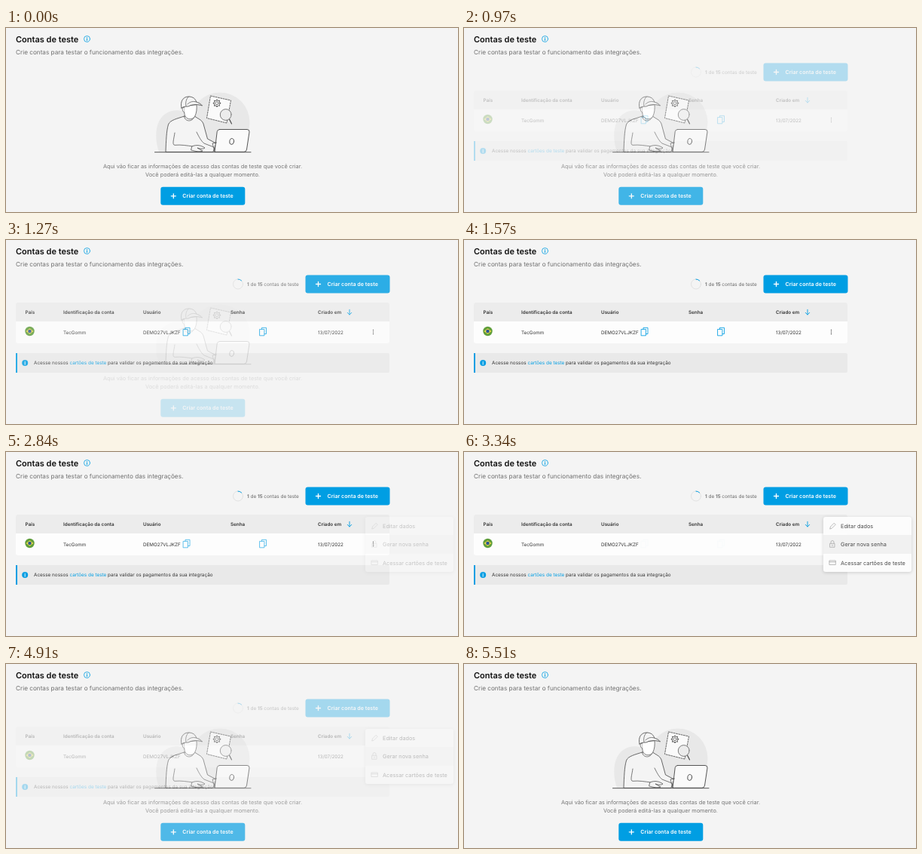
An HTML page with a canvas that plays this animation: 600x244 px, repeating every 5.63 s.

```html
<!DOCTYPE html>
<html lang="pt-BR">
<head>
<meta charset="utf-8">
<title>Contas de teste</title>
<style>
  html, body { margin: 0; width: 100%; height: 100%; overflow: hidden; background: #f4f4f4; }
  canvas { display: block; width: 600px; height: 244px; }
</style>
</head>
<body>
<canvas id="stage"></canvas>
<script>
const W = 600, H = 244, LOOP = 5630;
const BG = '#f4f4f4', BLUE = '#009ee3', INK = '#333', LINE = '#444';
const dpr = window.devicePixelRatio || 1;
let g;

function sizeCanvas(c) {
  c.width = Math.round(W * dpr);
  c.height = Math.round(H * dpr);
  return c.getContext('2d');
}

// Text is placed by the vertical centre of its capitals; returns the end x.
function text(str, x, y, size, color = INK, weight = 400, align = 'left') {
  g.font = `${weight} ${size}px Inter, "Open Sans", sans-serif`;
  g.textAlign = align;
  g.fillStyle = color;
  g.fillText(str, x, y + size * 0.36);
  return x + g.measureText(str).width;
}

function box(x, y, w, h, r, fill) {
  g.beginPath();
  g.roundRect(x, y, w, h, r);
  g.fillStyle = fill;
  g.fill();
}

function disc(x, y, r, fill) {
  g.beginPath();
  g.arc(x, y, r, 0, Math.PI * 2);
  g.fillStyle = fill;
  g.fill();
}

function ring(x, y, r, color, width, from = 0, to = Math.PI * 2) {
  g.beginPath();
  g.arc(x, y, r, from, to);
  g.strokeStyle = color;
  g.lineWidth = width;
  g.stroke();
}

function path(d, stroke, width = 0.8, fill) {
  const p = new Path2D(d);
  if (fill) {
    g.fillStyle = fill;
    g.fill(p);
  }
  if (stroke) {
    g.strokeStyle = stroke;
    g.lineWidth = width;
    g.stroke(p);
  }
}

function infoMark(x, y, color) {
  disc(x, y - 1.9, 0.6, color);
  path(`M${x} ${y - 0.6}V${y + 2.2}`, color, 0.95);
}

function button(x, y) {
  box(x, y, 112, 24, 3, BLUE);
  const cx = x + 17, cy = y + 12;
  path(`M${cx - 3} ${cy}h6M${cx} ${cy - 3}v6`, '#fff', 1.3);
  text('Criar conta de teste', x + 29, cy, 7.1, '#fff', 600);
}

function heading() {
  g.fillStyle = BG;
  g.fillRect(0, 0, W, H);
  text('Contas de teste', 13, 15, 11, '#111', 600);
  ring(107.5, 14.5, 4, BLUE, 0.8);
  infoMark(107.5, 14.5, BLUE);
  text('Crie contas para testar o funcionamento das integrações.', 13, 32, 8.2, '#707070');
}

function worker() {
  const shade = '#e8e8e8';
  disc(284, 125, 39.5, shade);
  path('M203 164C198 150 198 134 203 124C209 112 222 106 236 111L250 105L284 164Z', null, 0, shade);

  // plan sheet, gear and magnifier
  g.setLineDash([2, 1.4]);
  path('M271.5 90L298.5 96L293 126L266.5 119.5Z', LINE, 0.8, '#fafafa');
  g.setLineDash([]);
  for (let i = 0; i < 8; i++) {
    const a = i * Math.PI / 4;
    const c = Math.cos(a), s = Math.sin(a);
    path(`M${280 + 4 * c} ${99.7 + 4 * s}L${280 + 4.7 * c} ${99.7 + 4.7 * s}`, LINE, 1.2);
  }
  disc(280, 99.7, 4, '#fafafa');
  ring(280, 99.7, 4, LINE, 0.8);
  ring(280, 99.7, 2, LINE, 0.7);
  path('M296.5 121L299.5 127', LINE, 1.1);
  disc(291.7, 115, 7.4, '#ececec');
  ring(291.7, 115, 7.4, '#555', 0.75);

  // torso and arms
  path('M212 164C212.5 150 213 136 215.5 128C217.5 122 228 120 236.5 117L250.5 117C254 120 260 121.5 262 127L267.5 147L279 153L275 164Z', LINE, 0.8, BG);
  path('M236.5 117C237 124 247 126 250.5 117', LINE, 0.7);
  path('M224 139C223 147 220 155 224 155.3C232 154.5 241 156 248 157', LINE, 0.7);
  path('M253 138C256 144 259 150 263 153L276 158', LINE, 0.7);
  path('M247 157C253 154 260 156 264 159C261 161 257 160 254 159L261 163C256 165 250 163 246 162Z', LINE, 0.75, BG);

  // head and cap
  path('M236.5 104C236.5 111 236.5 115 238.5 118C241 121.5 247.5 122 250.5 117.5C253 113 253.5 107 253 102Z', LINE, 0.7, '#fff');
  path('M236.5 105C233 104 233.5 111 236.7 112', LINE, 0.7, '#fff');
  path('M233 106C231 98 234.5 91 242.5 91C248.5 91 252 94.5 252.5 98C256 99 259 101 260.5 103C255 101 247 101 242 104C239 104 236 104 233 106Z', LINE, 0.8, BG);
  path('M242.5 91C239 94 238 99 239 103.5M241 101C245 97 249 97 252.5 98', LINE, 0.65);

  // laptop and desk
  path('M283.5 134.5H320Q323.5 134.5 323 138L319.5 161Q319 164.3 316 164.3H277L280.2 137.5Q280.7 134.5 283.5 134.5Z', LINE, 0.9, '#fafafa');
  path('M277 164L274 153L279.5 152', LINE, 0.7);
  g.beginPath();
  g.ellipse(299.7, 150.5, 2.9, 4, 0.2, 0, Math.PI * 2);
  g.strokeStyle = LINE;
  g.lineWidth = 0.9;
  g.stroke();
  path('M197.5 164.7H325', LINE, 0.9);
}

function drawEmpty() {
  heading();
  worker();
  text('Aqui vão ficar as informações de acesso das contas de teste que você criar.', 261, 183, 7.33, '#757575', 400, 'center');
  text('Você poderá editá-las a qualquer momento.', 261, 194, 7.33, '#757575', 400, 'center');
  button(205.3, 210.8);
}

function copyIcon(x) {
  path(`M${x + 3} 118V116.3H${x + 9}V124.5H${x + 6.7}M${x + 0.5} 118.4H${x + 6.4}V126.8H${x + 0.5}Z`, BLUE, 0.85);
}

function drawTable() {
  heading();
  ring(308, 58.5, 6.5, '#dcdcdc', 0.8);
  ring(308, 58.5, 6.5, BLUE, 1, -Math.PI / 2, -Math.PI / 4);
  let x = 320;
  for (const [s, weight] of [['1', 600], [' de ', 400], ['15', 600], [' contas de teste', 400]]) {
    x = text(s, x, 58.5, 6.4, '#666', weight);
  }
  button(397.5, 46.5);

  box(13, 83, 496, 26, [3, 3, 0, 0], '#ececec');
  box(13, 108, 496, 29, [0, 0, 3, 3], '#fdfdfd');
  const heads = [['País', 25.5], ['Identificação da conta', 76], ['Usuário', 182], ['Senha', 298], ['Criado em', 414]];
  for (const [s, hx] of heads) text(s, hx, 95.5, 6.3, INK, 600);
  path('M456 92.3V99M453.2 96.3L456 99.1L458.8 96.3', BLUE, 0.9);

  disc(31.5, 121, 6.2, '#5f9e3a');
  path('M26.6 121L31.5 117.2L36.4 121L31.5 124.8Z', null, 0, '#f0d94a');
  disc(31.5, 121, 2.3, '#2b5796');
  text('TecGomm', 76, 122.5, 6.3);
  text('DEMO27VLJKZF', 182, 122.5, 6.3);
  text('13/07/2022', 414, 122.5, 6.3);

  box(13, 150, 496, 26, 2, '#e9e9e9');
  box(13, 150, 2, 26, 0, BLUE);
  disc(25.2, 163, 4, BLUE);
  infoMark(25.2, 163, '#fff');
  x = text('Acesse nossos ', 37, 163, 6.4);
  x = text('cartões de teste', x, 163, 6.4, BLUE);
  text(' para validar os pagamentos da sua integração', x, 163, 6.4);
}

function drawList() {
  drawTable();
  copyIcon(235);
  copyIcon(336.5);
  for (const y of [119.5, 122, 124.5]) disc(487.5, y, 0.7, '#444');
}

function drawMenu() {
  drawTable();
  g.shadowColor = 'rgba(0,0,0,.16)';
  g.shadowBlur = 4 * dpr;
  g.shadowOffsetY = dpr;
  box(477, 86, 117, 73, 3, '#fdfdfd');
  g.shadowColor = 'transparent';
  box(477, 110, 117, 25, 0, '#f1f1f1');
  const gray = '#aaa';
  path('M485.8 101.7L486.5 99L491.2 94.3L493.2 96.3L488.5 101Z', gray);
  path('M486 121.3H492V126.3H486ZM487 121V119.5A2 2 0 0 1 491 119.5V121M489 123V124.7', gray);
  path('M485.3 144H493.3V149.5H485.3ZM485.3 145.8H493.3', gray);
  ['Editar dados', 'Gerar nova senha', 'Acessar cartões de teste'].forEach((s, i) => {
    text(s, 500, 98.5 + i * 24.3, 7.3, '#484848');
  });
}

function render(draw) {
  const c = document.createElement('canvas');
  g = sizeCanvas(c);
  g.scale(dpr, dpr);
  g.lineJoin = g.lineCap = 'round';
  g.textRendering = 'geometricPrecision';
  draw();
  return c;
}

const stage = document.getElementById('stage');
const out = sizeCanvas(stage);
const [empty, list, menu] = [drawEmpty, drawList, drawMenu].map(render);

// Each fade advances in 100 ms steps, then settles.
const fades = [
  { at: 970, settle: 1570, from: empty, to: list },
  { at: 2840, settle: 4710, from: list, to: menu },
  { at: 4710, settle: 5510, from: menu, to: empty }
];

function frame(now) {
  const t = now % LOOP;
  const fade = fades.filter(f => t >= f.at).pop();
  out.globalAlpha = 1;
  out.drawImage(fade ? fade.from : empty, 0, 0);
  if (fade) {
    const step = t >= fade.settle ? 7 : Math.min(6, 1 + Math.floor((t - fade.at) / 100));
    out.globalAlpha = 1 - (1 - step / 7) ** 2;
    out.drawImage(fade.to, 0, 0);
  }
}

const start = performance.now();
function tick() {
  frame(performance.now() - start);
  requestAnimationFrame(tick);
}
tick();
</script>
</body>
</html>
```
